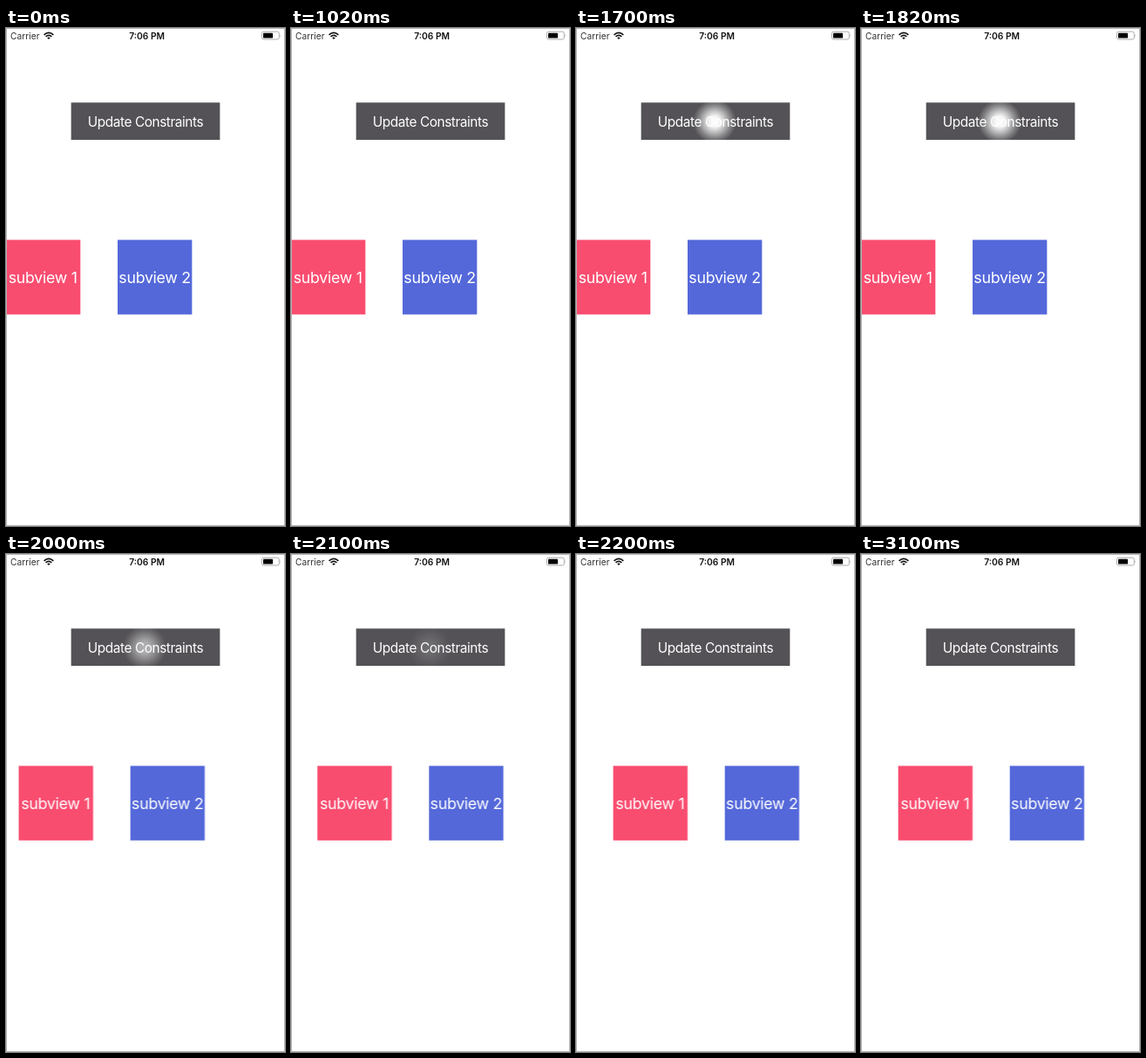
Recreate the animation shown at these times as an HTML page. Size 320 by 570 pixels, loop 3700 ms.

```html
<!DOCTYPE html>
<html lang="en">
<head>
<meta charset="utf-8">
<title>Update Constraints</title>
<style>
  html, body { margin: 0; width: 100%; height: 100%; overflow: hidden; background: #fff; }
  svg { display: block; width: 320px; height: 570px; }
  text {
    font-family: Inter, Roboto, sans-serif;
    font-optical-sizing: none;
    text-anchor: middle;
    fill: #fff;
  }
  .status { font-size: 10.24px; fill: #111; }
  .carrier { text-anchor: start; fill: #333; }
  .clock { font-weight: 600; }
  .title { font-size: 15.36px; letter-spacing: -.42px; }
  .label { font-size: 17.8px; letter-spacing: -.3px; }

  .views, .glow { animation: 3700ms step-end infinite; }
  .views { animation-name: slide; }
  .glow { animation-name: touch; }

  @keyframes slide {
    0% { transform: translateX(0); }
    54.054% { transform: translateX(14.6px); }  /* 2000 ms */
    56.757% { transform: translateX(30.3px); }  /* 2100 ms */
    59.459%, 100% { transform: translateX(42.67px); }  /* 2200 ms */
  }
  @keyframes touch {
    0% { opacity: 0; }
    45.946% { opacity: 1; }  /* 1700 ms */
    54.054% { opacity: .55; }
    56.757% { opacity: .15; }
    59.459%, 100% { opacity: 0; }
  }
</style>
</head>
<body>
<svg viewBox="0 0 320 570">
  <defs>
    <radialGradient id="light">
      <stop offset="0" stop-color="#fff"/>
      <stop offset=".25" stop-color="#fff" stop-opacity=".94"/>
      <stop offset=".5" stop-color="#fff" stop-opacity=".62"/>
      <stop offset=".75" stop-color="#fff" stop-opacity=".28"/>
      <stop offset="1" stop-color="#fff" stop-opacity="0"/>
    </radialGradient>
    <clipPath id="button"><rect x="74.67" y="85.33" width="170.67" height="42.67"/></clipPath>
  </defs>

  <rect width="320" height="570" fill="#fff"/>

  <!-- Status bar -->
  <text class="status carrier" x="5" y="12.6">Carrier</text>
  <g fill="none" stroke="#111" stroke-width="1.6">
    <path d="M43.6 7.8Q49 2.9 54.4 7.8"/>
    <path d="M45.6 9.9Q49 6.9 52.4 9.9"/>
    <path d="M49 13L47.2 11.2Q49 9.8 50.8 11.2Z" fill="#111" stroke="none"/>
  </g>
  <text class="status clock" x="161.6" y="12.6">7:06 PM</text>
  <rect x="293.5" y="4.2" width="19.8" height="8.8" rx="2" fill="none" stroke="#999" stroke-width=".8"/>
  <rect x="295" y="5.7" width="11" height="5.9" rx=".7" fill="#000"/>
  <path d="M314.4 7.2q1.3 1.4 0 2.9z" fill="#999"/>

  <!-- Button -->
  <rect x="74.67" y="85.33" width="170.67" height="42.67" fill="#545256"/>
  <text class="title" x="160" y="112.6">Update Constraints</text>
  <g clip-path="url(#button)">
    <circle class="glow" cx="159" cy="107" r="25" fill="url(#light)"/>
  </g>

  <!-- Sliding pair -->
  <g class="views">
    <rect x="0" y="242.5" width="85.33" height="85.33" fill="#f94d70"/>
    <text class="label" x="42.2" y="292">subview 1</text>
    <rect x="128" y="242.5" width="85.33" height="85.33" fill="#5468da"/>
    <text class="label" x="170.6" y="292">subview 2</text>
  </g>

  <rect x=".5" y=".5" width="319" height="569" fill="none" stroke="#b4b4b4"/>
</svg>
</body>
</html>
```
